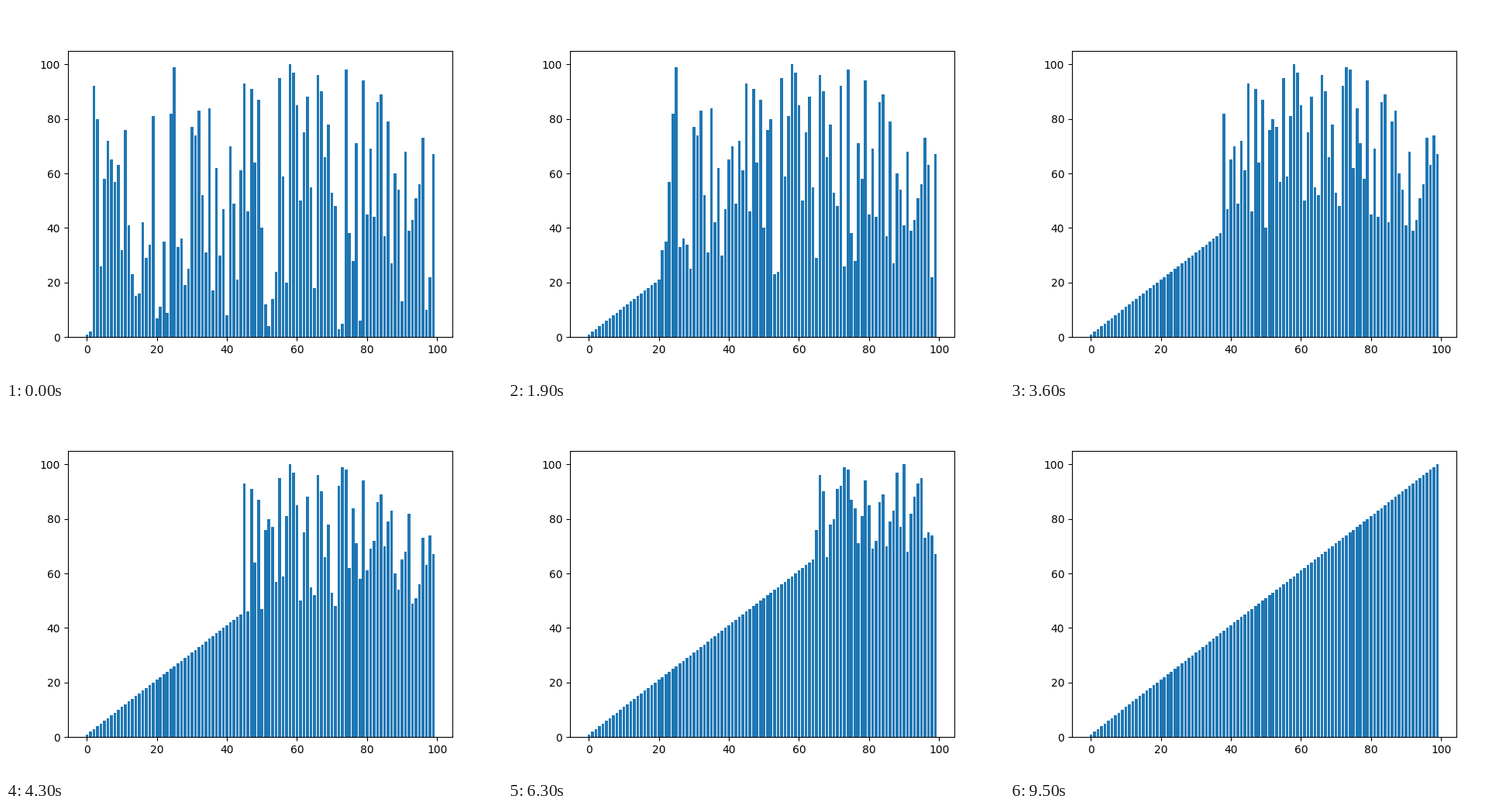
These frames come from a looping animation (640x480 px, 9900 ms). A matplotlib script:

```python
import matplotlib.pyplot as plt
from matplotlib.animation import FuncAnimation

FRAMES = 99
INTERVAL = 100  # ms

# Shuffled heights; the two smallest are already in place.
START = [
    1, 2, 92, 80, 26, 58, 72, 65, 57, 63,
    32, 76, 41, 23, 15, 16, 42, 29, 34, 81,
    7, 11, 35, 9, 82, 99, 33, 36, 19, 25,
    77, 74, 83, 52, 31, 84, 17, 62, 30, 47,
    8, 70, 49, 21, 61, 93, 46, 91, 64, 87,
    40, 12, 4, 14, 24, 95, 59, 20, 100, 97,
    85, 50, 75, 88, 55, 18, 96, 90, 66, 78,
    53, 48, 3, 5, 98, 38, 28, 71, 6, 94,
    45, 69, 44, 86, 89, 37, 79, 27, 60, 54,
    13, 68, 39, 43, 51, 56, 73, 10, 22, 67,
]


def selection_sort(values, done):
    """Return the list after the first `done` places have been settled."""
    a = list(values)
    for i in range(done):
        low = a.index(min(a[i:]))
        a[i], a[low] = a[low], a[i]
    return a


fig, ax = plt.subplots(figsize=(6.4, 4.8), dpi=100)
bars = ax.bar(range(len(START)), START, color="#1f77b4")


def update(frame):
    heights = selection_sort(START, min(frame + 2, len(START)))
    for bar, height in zip(bars, heights):
        bar.set_height(height)
    return list(bars)


anim = FuncAnimation(fig, update, frames=FRAMES, interval=INTERVAL,
                     repeat=True, repeat_delay=0, blit=False)
plt.show()
```
